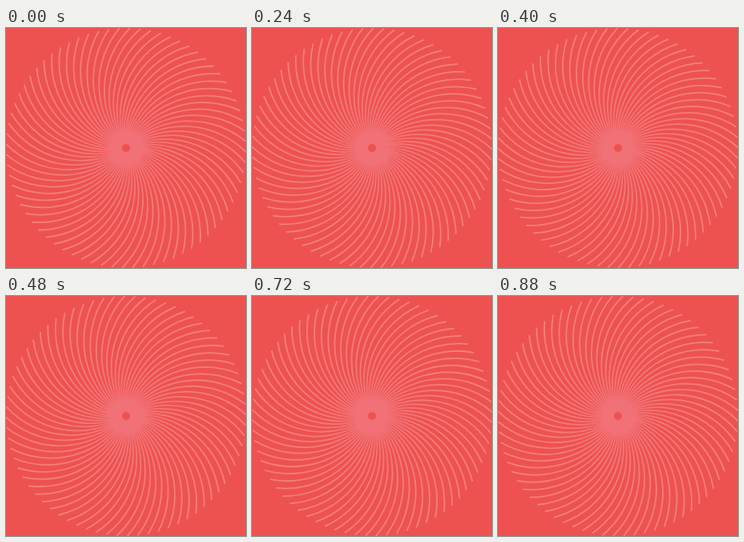
Recreate the animation shown at these times as an HTML page with a canvas. Size 300 by 300 pixels, loop 0.96 s.

```html
<!DOCTYPE html>
<html lang="en">
<head>
<meta charset="utf-8">
<title>Spiral</title>
<style>
  html, body { margin: 0; width: 100%; height: 100%; overflow: hidden; background: #ed5250; }
  canvas { display: block; width: 300px; height: 300px; }
</style>
</head>
<body>
<canvas id="stage" width="300" height="300"></canvas>
<script>
  const SIZE = 300, MID = SIZE / 2;
  const SPOKES = 72, LOOP = 960, STEPS = 12;
  const BACK = '#ed5250';
  const rad = deg => deg * Math.PI / 180;

  const gap = 360 / SPOKES;
  const bend = rad(43);                        // angle between arc and its chord
  const radius = MID / (2 * Math.sin(bend));   // arc runs from the hub to the rim
  const startAngle = -93.1;

  const ctx = document.getElementById('stage').getContext('2d');
  const ink = ctx.createRadialGradient(0, 0, 20, 0, 0, MID);
  ink.addColorStop(0, '#f17176');
  ink.addColorStop(0.4, '#f37a79');
  ink.addColorStop(1, '#f4807b');

  // One path for all spokes, so overlaps stay flat.
  const spokes = new Path2D();
  for (let i = 0; i < SPOKES; i++) {
    const dir = rad(i * gap) - bend;
    const from = dir - Math.PI / 2;
    spokes.moveTo(0, 0);
    spokes.arc(-radius * Math.sin(dir), radius * Math.cos(dir), radius, from, from + 2 * bend);
  }

  function draw(time) {
    const step = Math.floor((time % LOOP) / LOOP * STEPS);
    ctx.setTransform(1, 0, 0, 1, 0, 0);
    ctx.fillStyle = BACK;
    ctx.fillRect(0, 0, SIZE, SIZE);

    ctx.translate(MID, MID);
    ctx.rotate(rad(startAngle - gap * step / STEPS));
    ctx.strokeStyle = ink;
    ctx.lineWidth = 1.8;
    ctx.stroke(spokes);

    ctx.beginPath();
    ctx.arc(0, 0, 5, 0, 2 * Math.PI);
    ctx.fill();
  }

  const start = performance.now();
  function tick() {
    draw(performance.now() - start);
    requestAnimationFrame(tick);
  }
  tick();
</script>
</body>
</html>
```
